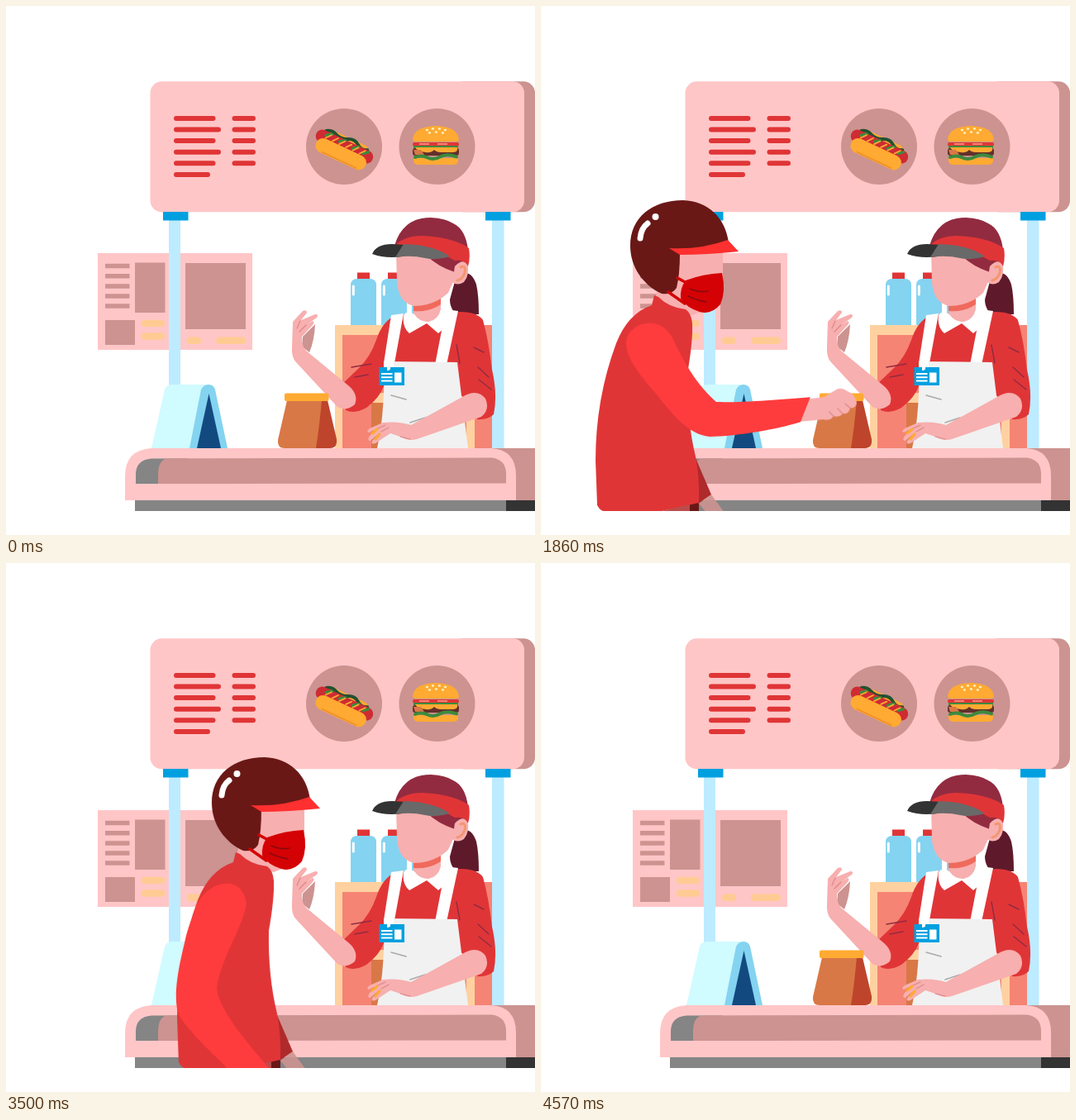
These frames come from a looping animation (640x640 px, 4.78 s). An HTML page without scripts:

```html
<!DOCTYPE html>
<html lang="en">
<head>
<meta charset="utf-8">
<title>Food stall</title>
<style>
html, body { margin: 0; height: 100%; overflow: hidden; background: #fff; }
svg { display: block; width: 100vw; height: 100vh; }
.pink { fill: #ffc6c7; } .dusty { fill: #cc9390; } .red { fill: #e03537; }
.skin { fill: #f7afaf; } .wine { fill: #922b40; } .maroon { fill: #691816; }
.sky { fill: #bdebff; } .blue { fill: #00a0e0; } .aqua { fill: #84d3f0; }
.orange { fill: #ffaa32; } .brown { fill: #d87846; } .rust { fill: #be452b; }
.peach { fill: #ffd1a0; } .salmon { fill: #f58474; } .gray { fill: #858585; }
.coal { fill: #333; } .white { fill: #fff; } .green { fill: #3d8a3c; }
.line { fill: none; stroke-linecap: round; stroke-linejoin: round; }

.walk, .arm, .hand, .bag { animation: 4780ms linear infinite; }
.walk { animation-name: walk; }
.arm { animation-name: arm; fill: #ff3c3d; }
.hand { animation-name: hand; transform-origin: 320px 488px; }
.bag { animation-name: bag; }

@keyframes walk {
  0% { transform: translateX(-260px); }
  10.46% { transform: translateX(-260px); animation-timing-function: cubic-bezier(.333, .667, .667, 1); }
  32.72% { transform: none; }
  62.93% { transform: none; animation-timing-function: cubic-bezier(.35, .05, .65, .95); }
  95.6%, 100% { transform: translateX(580px); }
}
@keyframes arm {
  0%, 58.6%, 100% { d: path("M86 425C95 385 145 372 150 412C146 440 118 480 114 515C118 545 155 585 196 633L152 640C125 605 95 585 70 550C58 530 70 480 75 460C78 445 82 435 86 425Z"); }
  25.1% { d: path("M86 425C95 385 145 372 150 412C146 440 118 480 114 515C118 545 155 585 196 633L152 640C125 605 95 585 70 550C58 530 70 480 75 460C78 445 82 435 86 425Z"); animation-timing-function: ease-in; }
  34.94%, 52.3% { d: path("M99 412C99 385 142 374 154 398C158 430 165 480 187 506C215 513 260 525 291 535L269 562C235 555 190 549 153 537C135 520 122 480 112 455C103 435 99 425 99 412Z"); animation-timing-function: ease-out; }
  39.1% { d: path("M103 408C103 385 140 372 157 398C168 418 180 450 212 479C240 480 290 476 326 473L314 503C285 512 240 520 204 521C178 518 160 495 140 470C118 445 103 425 103 408Z"); }
  44.98% { d: path("M103 408C103 385 140 372 157 398C168 418 180 450 212 479C240 480 290 476 326 473L314 503C285 512 240 520 204 521C178 518 160 495 140 470C118 445 103 425 103 408Z"); animation-timing-function: ease-in; }
}
@keyframes hand {
  0%, 58.6%, 100% { transform: translate(-146px, 149px) rotate(40deg); }
  25.1% { transform: translate(-146px, 149px) rotate(40deg); animation-timing-function: ease-in; }
  34.94%, 52.3% { transform: translate(-40px, 61px) rotate(15deg); animation-timing-function: ease-out; }
  39.1% { transform: translate(0, 0) rotate(0deg); }
  44.98% { transform: translate(0, 0) rotate(0deg); animation-timing-function: ease-in; }
}
@keyframes bag {
  0% { transform: translate(0, 0); }
  44.98% { transform: translate(0, 0); animation-timing-function: ease-in; }
  52.3% { transform: translate(-45px, 88px); animation-timing-function: ease-out; }
  58.6% { transform: translate(-190px, 180px); animation-timing-function: step-end; }
  95.6%, 100% { transform: translate(0, 0); }
}
</style>
</head>
<body>
<svg viewBox="0 0 640 640">
<defs>
  <clipPath id="floor"><path d="M0 0H640V611H0Z"/></clipPath>
  <g id="bottle">
    <path class="red" d="M425 322.500H440V331H425Z"/>
    <path class="aqua" d="M417 386V338Q417 330 425 330H440Q448 330 448 338V386Z"/>
    <path class="line" stroke="#fff" stroke-width="3" d="M420.300 339V349"/>
  </g>
  <path id="cap" class="blue" d="M190 249H220.500V259.500H190Z"/>
</defs>

<g clip-path="url(#floor)">
  <!-- wall poster -->
  <path class="pink" d="M111 299H298V416H111Z"/>
  <path class="dusty" d="M156 310.500H192.500V371H156ZM120 380H156V410H120ZM217 311H290V391H217Z"/>
  <path class="line" stroke="#cc9390" stroke-width="5.500" style="stroke-linecap:butt" d="M120 314.500h29.500M120 326.700h29.500M120 339h29.500M120 351h29.500M120 363h29.500"/>
  <path class="line" stroke="#ffcb93" stroke-width="8.500" d="M168 384h20M168 399.500h20M223 404.700h9M258 404.700h28"/>

  <!-- sign -->
  <rect class="dusty" x="540" y="91.300" width="100" height="158" rx="14"/>
  <rect class="pink" x="174.500" y="91.300" width="452.500" height="158" rx="14"/>
  <path class="line" stroke="#e03537" stroke-width="6" d="M206 136h44.500M206 149.500h51M206 163h44.500M206 176.700h51M206 190.300h44.500M206 204h38M276.500 136h22.500M276.500 149.500h22.500M276.500 163h22.500M276.500 176.700h22.500M276.500 190.300h22.500"/>
  <circle class="dusty" cx="409" cy="170" r="46"/>
  <circle class="dusty" cx="521.500" cy="170" r="46"/>

  <!-- hot dog -->
  <g transform="translate(409 171) rotate(25)">
    <rect class="orange" x="-29" y="-13" width="58" height="14" rx="7"/>
    <path class="line" stroke="#23512f" stroke-width="4" d="M-28 -9Q-22 -13 -15 -10T0 -11T14 -10T27 -9"/>
    <rect x="-37.500" y="-9" width="75" height="16" rx="8" fill="#cf2b33"/>
    <path class="line" stroke="#3d8a3c" stroke-width="3.500" d="M-26 -4L-20 -8M-8 -4L-2 -8M10 -3L16 -8M24 -3L29 -7"/>
    <path class="line" stroke="#ffaa32" stroke-width="1.800" d="M-25 -1L-20 -7M-16 -1L-11 -7M-7 -1L-2 -7M2 -1L7 -7M11 -1L16 -7M20 -1L25 -7"/>
    <rect class="orange" x="-33" y="0" width="66" height="18" rx="9"/>
    <path class="line" stroke="#f08b28" stroke-width="1.500" d="M-22 16.500H24"/>
  </g>

  <!-- burger -->
  <path class="orange" d="M492 162Q493 146 520 145Q547 146 548 162Q547 164 543 164H497Q493 164 492 162Z"/>
  <path class="line" stroke="#fff0bd" stroke-width="2.600" d="M509 150h.8M516 148.500h.8M524 148.500h.8M531 150h.8M512 153.500h.8M520 152.500h.8M528 153.500h.8"/>
  <rect class="red" x="492" y="165" width="56" height="4.500" rx="2"/>
  <path stroke="#f58474" stroke-width="2" d="M500 167H512M522 167H534"/>
  <path class="green" d="M493 169H547V172H493Z"/>
  <rect x="492" y="172" width="56" height="9" rx="3" fill="#63302b"/>
  <path class="orange" d="M495 171H546Q547 177 540 177H526Q521 177 518 174Q514 178 508 177Q497 176 495 171Z"/>
  <path class="brown" d="M493 174H502L506 180H495Z"/>
  <path class="orange" d="M493 184H547V188Q546 192 541 192H499Q494 192 493 188Z"/>
  <path class="line" stroke="#3d8a3c" stroke-width="4" d="M495 183Q503 180 510 183.500T525 182.500T545 182.500"/>

  <!-- shelf and bottles -->
  <use href="#bottle"/><use href="#bottle" x="37"/><use href="#bottle" x="74"/>
  <path class="peach" d="M398 386H567V535H398Z"/>
  <path class="salmon" d="M567 386H588V535H567ZM407 398H557V468H407ZM407 480H557V535H407Z"/>
  <path class="brown" d="M442 480H480V535H442Z"/>

  <!-- posts -->
  <path class="sky" d="M197 259H211V460H197ZM588 259H602.500V535H588Z"/>
  <use href="#cap"/><use href="#cap" x="390"/>

  <!-- seller -->
  <path fill="#5e1a2b" d="M545 326Q562 316 569 337Q572 350 572 373Q560 372 552 379Q537 370 537 355Z"/>
  <path class="red" d="M471 374Q455 382 448 404Q441 424 427 438L404 460L411 489Q422 494 436 486Q452 474 457 460L462 470H549L562 480L570 500Q583 501 590 494Q595 470 588 440Q584 405 577 380Q570 370 550 370L525 372H490Z"/>
  <path class="skin" d="M493 358V374Q497 384 511 382Q523 380 526 370V350Z"/>
  <path fill="#ef6a5c" d="M493 361Q511 361 526 354V361Q511 371 493 369Z"/>
  <path class="white" d="M481 374Q486 367 494 373Q500 382 511 382Q523 380 526 367Q533 364 538 371Q535 388 523 396L509 384L488 396Q479 388 481 374Z"/>
  <path class="white" d="M466 374L481 372L470 432H457ZM532 367L547 369L533 434H519Z"/>
  <path fill="#f1f1f1" d="M457 430L546 431L559 535H449Q459 490 457 430Z"/>
  <path class="line" stroke="#aaa" stroke-width="1.500" d="M466 471L484 476M489 504L507 498"/>
  <path class="line" stroke="#922b40" stroke-width="1.500" d="M418 437L442 433M422 449L438 446M545 410L549 432M566 413L578 419M571 437L584 449M572 452L587 464"/>
  <path class="blue" d="M451.500 437H482V459H451.500Z"/>
  <path class="white" d="M457 430H469V437H465Q466 441 461 441V437H457ZM470 443.500H478.500V455.500H470Z"/>
  <path stroke="#fff" stroke-width="2" d="M454 445H467.500M454 449.300H467.500M454 453.500H467.500"/>

  <path class="dusty" d="M359 400L374 385Q373 405 367 419L358 412Z"/>
  <path class="skin" d="M347 382L359 369Q364 367 364 371L357 380L374 373Q379 373 376 377L363 386L371 381Q374 382 371 386L358 400Q357 410 363 417L414 459Q427 470 422 482Q412 491 401 485L351 431Q345 425 346 412Z"/>
  <path class="line" stroke="#dd8889" stroke-width="1.200" d="M356 381L352 390M363 386L355 394"/>
  <path class="skin" d="M552 473Q570 462 580 475Q586 488 575 497L497 524Q487 527 477 521L465 517L447 529Q441 531 443 526L454 515L441 526Q436 526 440 520L450 511L439 516Q435 515 440 511L456 504Q475 502 490 507Z"/>
  <path class="line" stroke="#dd8889" stroke-width="1.200" d="M454 515L463 510M450 511L459 507M477 521L489 524"/>
  <path class="line" stroke="#ffaa32" stroke-width="3" d="M443 517L449 512M447 524L452 518"/>

  <path class="skin" d="M472 296L473 335Q475 358 493 363Q518 363 535 347L545 325L540 296Z"/>
  <path class="wine" d="M509 302L536 298L559 309L543 322Q522 315 509 302Z"/>
  <path class="skin" d="M543 315Q551 306 558 311Q562 324 554 334Q546 339 540 334Z"/>
  <path class="line" stroke="#f3966f" stroke-width="3" d="M550 316Q557 313 555 323Q552 331 546 332"/>
  <path class="wine" d="M470 290Q480 256 514 256Q532 257 541 263Q556 270 559 295Z"/>
  <path class="red" d="M470 290Q482 278 503 278Q542 280 560 293Q562 305 559 315Q555 306 543 308Q530 300 508 294Z"/>
  <path class="coal" d="M443 300Q448 288 467 288L485 289L480 303Q459 306 443 300Z"/>
  <path fill="#696969" d="M481 288Q518 289 537 303Q522 308 507 305Q490 301 471 304Z"/>

  <!-- tent card -->
  <path fill="#d0fbff" d="M176 535L192 464Q194 458 201 458H247L224 535Z"/>
  <path class="aqua" d="M222 535L236 464Q239 458 245 458Q251 458 253 464L268 535Z"/>
  <path fill="#124a80" d="M245.500 469L260 535H231Z"/>

  <!-- counter -->
  <path class="dusty" d="M585 535H640V598H585Z"/>
  <path class="pink" d="M144 598V569Q144 537 176 535H587Q617 537 617 568V598Z"/>
  <path class="gray" d="M157 578V567Q157 549 176 547.500H220V578ZM156 598H606V611H156Z"/>
  <path class="dusty" d="M184 578V567Q184 550 194 547.500L588 546.500Q605 549 605 566V577.500Z"/>
  <path class="coal" d="M605 598H640V611H605Z"/>

  <!-- courier -->
  <g class="walk">
    <path class="maroon" d="M178 600H191V611H178Z"/>
    <path class="dusty" fill-opacity=".9" d="M191 602L206 591L222 613H200Z"/>
    <path fill="#ae2a2b" d="M184 540L206 591L190 602Z"/>
    <path class="skin" d="M140 345L168 330H195L205 365L183 374Q160 368 138 358Z"/>
    <path class="red" d="M137 350L134 362Q105 372 91 408Q66 475 66 550L68 604Q72 612 80 612H142L191 601Q192 570 187 545Q176 500 177 445Q184 405 183 384Q182 372 175 367Q155 365 142 352Z"/>
    <path fill="#bd4b4b" d="M142 612L180 603V612Z"/>
    <path class="skin" d="M160 296H220V340L195 366L163 345Z"/>
    <path class="maroon" d="M108 290C108 256 134 235 172 235C202 236 223 256 227 286L168 299Q168 325 164 341Q158 350 146 348C124 338 108 316 108 290Z"/>
    <path fill="#ff302f" d="M155 293Q193 295 226 283L239 297Q200 301 168 301Z"/>
    <circle class="white" cx="138.500" cy="255" r="4"/>
    <path class="line" stroke="#fff" stroke-width="7" d="M120 281Q121 269 129 263"/>
    <path class="line" stroke="#d40204" stroke-width="3.500" d="M165 329L178 336M154 346L174 360"/>
    <path fill="#d40204" d="M175 332Q196 324 219 323Q224 345 217 361Q206 374 192 370Q176 365 169 354Q168 341 175 332Z"/>
    <path class="line" stroke="#8a0a10" stroke-width="1.700" d="M180 342Q190 347 202 345M178 351Q188 356 200 358"/>
  </g>

  <g class="bag">
    <path class="brown" d="M340 477H384L380 535H337Q328 535 329 525Z"/>
    <path class="rust" d="M382 477H389L400 524Q401 535 392 535H375Q379 510 382 477Z"/>
    <rect class="orange" x="337" y="468.500" width="53.500" height="9.500" rx="2"/>
  </g>

  <g class="walk">
    <g class="hand">
      <path class="skin" d="M318 476L342 473L359 463Q365 461 371 466Q380 469 382 480Q381 487 374 486Q373 494 365 493Q361 498 354 496Q350 502 342 500L310 503Z"/>
      <path class="line" stroke="#dd8889" stroke-width="1.200" d="M374 486L368 481M365 493L359 487M354 496L349 491"/>
    </g>
    <path class="arm" d="M86 425"/>
  </g>
</g>
</svg>
</body>
</html>
```
